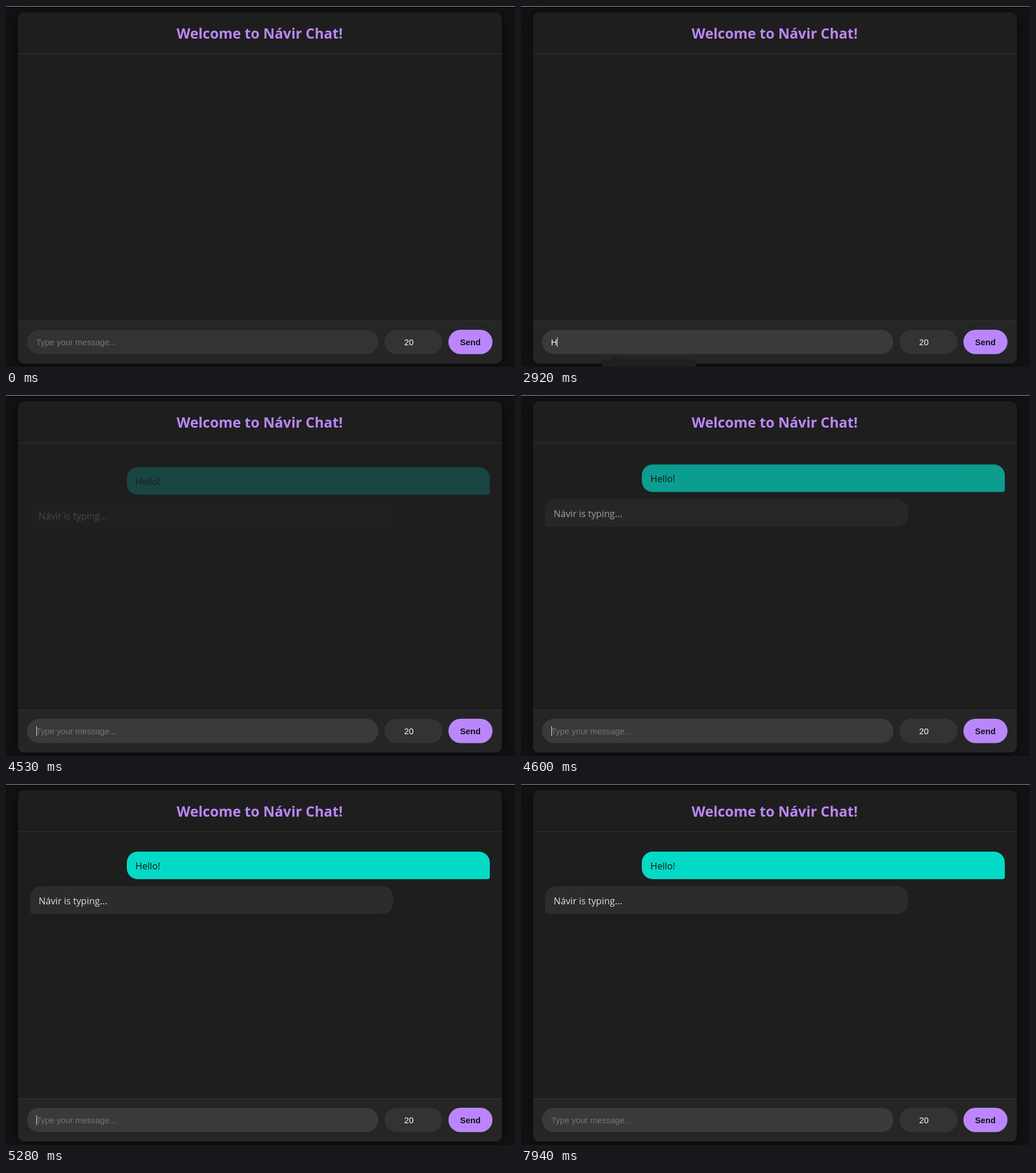
These frames come from a looping animation (889 px wide and 630 px high, 8000 ms). An HTML page:

```html
<!DOCTYPE html>
<html lang="en">
<head>
<meta charset="utf-8">
<title>Chat demo</title>
<style>
  html, body { margin: 0; width: 100%; height: 100%; overflow: hidden; background: #121212; }
  svg { display: block; }
  text { font-family: "Open Sans", "Noto Sans", sans-serif; }
  .ui { font: 14.7px "Liberation Sans", sans-serif; fill: #fff; }
  .title { font-size: 24.7px; font-weight: 700; fill: #bb86fc; }
  .message { font-size: 16.2px; }
  .panel { filter: drop-shadow(0 4px 10px rgba(0, 0, 0, .5)); }
</style>
</head>
<body>
<svg width="889" height="630" viewBox="0 0 889 630">
  <rect width="889" height="630" fill="#121212"/>
  <rect class="panel" x="21" y="11" width="845" height="613" rx="11" fill="#1e1e1e"/>
  <rect width="889" height="1" fill="#9a9a9a"/>
  <path d="M21 549H866V613a11 11 0 0 1-11 11H32a11 11 0 0 1-11-11z" fill="#252525"/>
  <path d="M21 83.5H866M21 549.5H866" stroke="#333"/>
  <text class="title" x="443" y="57" text-anchor="middle">Welcome to Návir Chat!</text>

  <g id="messages">
    <path d="M230 118H826a19 19 0 0 1 19 19V162a4 4 0 0 1-4 4H230a19 19 0 0 1-19-19V137a19 19 0 0 1 19-19z" fill="#03dac6"/>
    <text class="message" x="226" y="149" fill="#121212">Hello!</text>
    <path d="M61 178.500H657a19 19 0 0 1 19 19V207.500a19 19 0 0 1-19 19H46a4 4 0 0 1-4-4V197.500a19 19 0 0 1 19-19z" fill="#2c2c2c"/>
    <text class="message" x="57" y="209.500" fill="#e0e0e0">Návir is typing...</text>
  </g>

  <rect id="field" x="36.700" y="565" width="613.700" height="42.500" rx="21.250"/>
  <rect x="661" y="565" width="101.300" height="42.500" rx="21.250" fill="#333"/>
  <rect x="772.700" y="565" width="77" height="42.500" rx="21.250" fill="#bb86fc"/>
  <text class="ui" x="695.500" y="591.500">20</text>
  <text class="ui" x="811" y="591.500" text-anchor="middle" style="font-weight:700;fill:#121212">Send</text>
  <text class="ui" id="placeholder" x="52.500" y="591.500" style="fill:#757575">Type your message...</text>
  <text class="ui" id="typed" x="52.500" y="591.500"></text>
  <rect id="caret" y="578" width="1" height="17" fill="#e0e0e0"/>

  <path id="popup" d="M141 630V622a5 5 0 0 1 5-5H155L163.500 609L172 617H301a5 5 0 0 1 5 5V630z" fill="#1f1f1f"/>
  <g id="tooltip">
    <rect x="106.500" y="601.500" width="144" height="26" fill="#242424" stroke="#fff" stroke-width="1.300"/>
    <text x="114" y="619.500" font-size="12" fill="#e8e8e8">Please fill out this field.</text>
  </g>

  <circle id="click" cx="95" cy="586" r="12.800" fill="#ebe114"/>
  <path id="arrow" d="M0 0V16L4 12.500L6.500 18L9 17L6.500 11.500H11.500z" fill="#fff" stroke="#000"/>
  <path id="beam" d="M-5-8.500H-1.500L0-7.500L1.500-8.500H5M0-7.500V7.500M-5 8.500H-1.500L0 7.500L1.500 8.500H5" fill="none" stroke="#fff" stroke-width="1.200"/>
</svg>
<script>
const LOOP = 8000, SENT = 4530, BLINK = 530;
const el = id => document.getElementById(id);
const clamp = v => Math.min(1, Math.max(0, v));
const show = (id, on) => el(id).style.display = on ? "" : "none";
const opacity = (id, v) => { show(id, v > 0); el(id).setAttribute("opacity", v); };
const move = (id, x, y) => el(id).setAttribute("transform", `translate(${x} ${y})`);
const last = (list, t) => list.filter(item => item[0] <= t).pop();

// [time, text, caret x]
const typing = [[0, "", 53], [2920, "H", 63], [3180, "He", 71], [3390, "Hel", 74],
  [3520, "Hell", 77], [3660, "Hello", 86], [4190, "Hello!", 90], [SENT, "", 53]];

// [time, shape, x, y]
const pointer = [[0], [720, "arrow", 2, 571], [790, "beam", 43.5, 580], [860, "beam", 84.5, 585],
  [930, "beam", 97.5, 587], [1850, "beam", 95.5, 580], [1950, "beam", 90.5, 571], [2050]];

// The CSS "ease" curve: cubic-bezier(.25, .1, .25, 1)
function ease(x) {
  const bezier = (a, b, s) => 3 * a * s * (1 - s) ** 2 + 3 * b * s * s * (1 - s) + s ** 3;
  let low = 0, high = 1;
  for (let i = 0; i < 20; i++) {
    const mid = (low + high) / 2;
    if (bezier(.25, .25, mid) < x) low = mid; else high = mid;
  }
  return bezier(.1, 1, low);
}

function caretVisible(t) {
  if (t < 1530) return false;
  if (t < 2920) return t < 2050 || t >= 2590;
  if (t < 4740) return true;
  return Math.floor((t - 4750) / BLINK) % 2 === 1;
}

function draw(t) {
  const [, text, caretX] = last(typing, t);
  el("typed").textContent = text;
  show("placeholder", !text);
  show("caret", caretVisible(t));
  el("caret").setAttribute("x", caretX);

  const shade = Math.round(51 + 7 * clamp((t - 1500) / 300));
  el("field").setAttribute("fill", `rgb(${shade},${shade},${shade})`);

  show("tooltip", t >= 1460 && t < 1530);
  opacity("popup", t < 2920 ? clamp((t - 1500) / 160) : clamp((3180 - t) / 190));
  opacity("click", t < 1460 || t >= 1660 ? 0 : .56 - .2 * Math.floor((t - 1460) / 70));

  const [, shape, x, y] = last(pointer, t);
  for (const id of ["arrow", "beam"]) {
    show(id, id === shape);
    if (id === shape) move(id, x, y);
  }

  // The entrance advances in 70 ms steps, already under way at the first one.
  const step = Math.floor((t - SENT) / 70) * 70;
  const entrance = t < SENT ? 0 : ease(clamp((step + 48) / 300));
  opacity("messages", entrance);
  move("messages", 0, 10 * (1 - entrance));
}

const start = performance.now();
function tick() {
  draw((performance.now() - start) % LOOP);
  requestAnimationFrame(tick);
}
tick();
</script>
</body>
</html>
```
